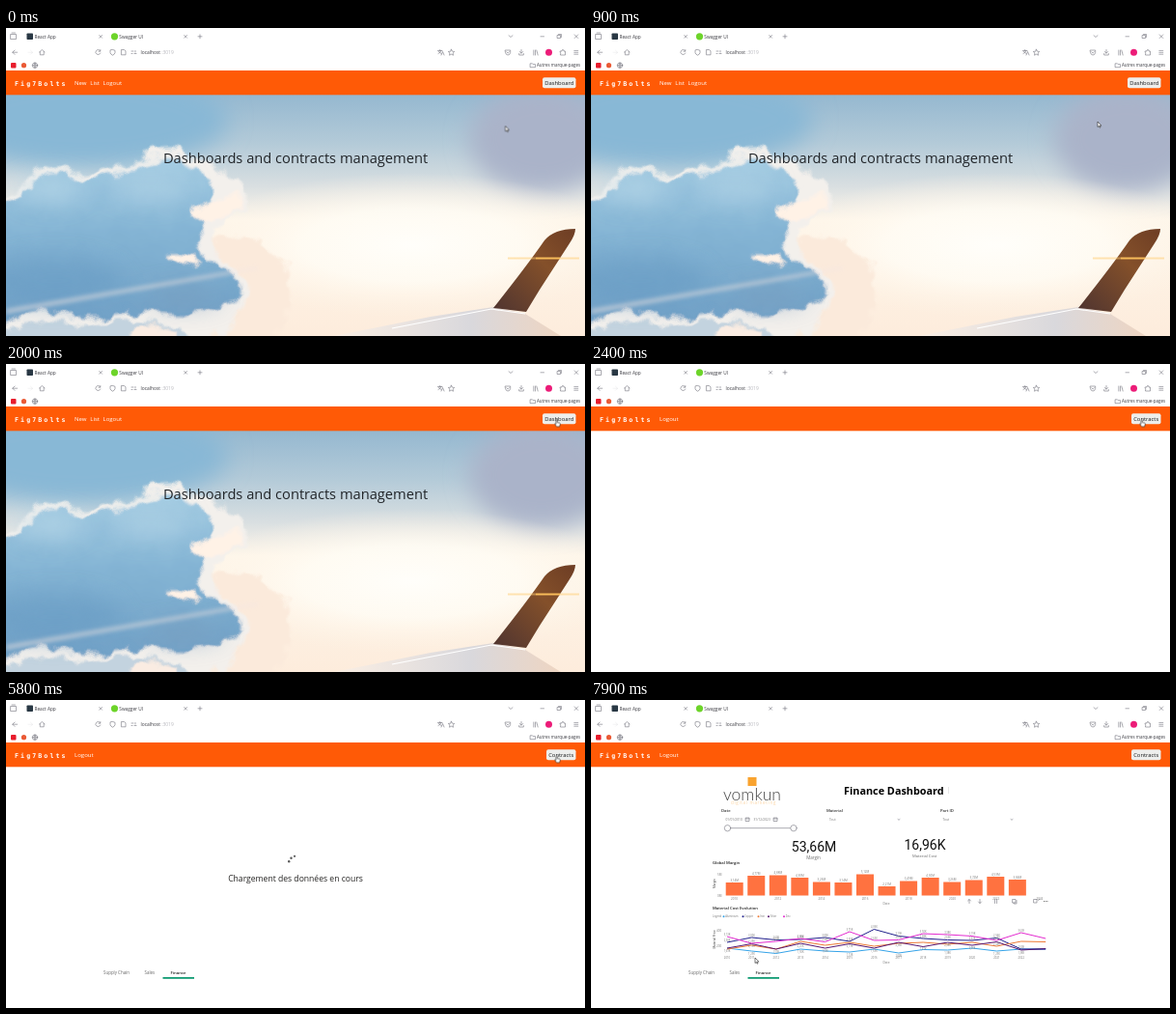
Animation of 600x319 px, one loop 8000 ms. Source, as an HTML page:

```html
<!DOCTYPE html>
<html lang="en">
<head>
<meta charset="utf-8">
<title>Dashboard walkthrough</title>
<style>
html,body{margin:0;width:100%;height:100%;overflow:hidden;background:#fff}
svg{display:block;width:100%;height:100%}
text{font-family:"Open Sans","Noto Sans",sans-serif;white-space:pre}
.icon{fill:none;stroke:#73737c;stroke-width:.6;stroke-linecap:round;stroke-linejoin:round}
.mid{text-anchor:middle}
.mono{font-family:"DejaVu Sans Mono",monospace;font-weight:700;letter-spacing:2.1px}
.nav{font-weight:500}
.kpi{font-family:Roboto,sans-serif}
.thin{font-family:Lato,sans-serif;font-weight:300}
.step{animation:8s step-end infinite}
#photo{animation-name:photo}
#navHome{animation-name:navHome}
#navReport{animation-name:navReport}
#tabs{animation-name:tabs}
#loading{animation-name:loading}
#filters{animation-name:filters}
#charts{animation-name:charts}
#tools{animation-name:tools}
#arrow{animation-name:arrow}
#hand{animation-name:hand}
#splash{animation:splash 8s linear infinite}
#cursor{animation:move 8s linear infinite}
#spin{transform-origin:300px 168.5px;animation:spin 8s linear infinite}
@keyframes photo{27.5%,100%{opacity:0}}
@keyframes navHome{30%,100%{opacity:0}}
@keyframes navReport{0%{opacity:0}30%,100%{opacity:1}}
@keyframes tabs{0%{opacity:0}65%,100%{opacity:1}}
@keyframes loading{0%{opacity:0}68.75%{opacity:1}76.25%,100%{opacity:0}}
@keyframes filters{0%{opacity:0}76.25%,100%{opacity:1}}
@keyframes charts{0%{opacity:0}78.75%,100%{opacity:1}}
@keyframes tools{0%{opacity:0}96.25%,100%{opacity:1}}
@keyframes arrow{0%{opacity:1}22.5%{opacity:0}90%,100%{opacity:1}}
@keyframes hand{0%{opacity:0}22.5%{opacity:1}90%,100%{opacity:0}}
@keyframes splash{0%,30%{opacity:0}41.25%,48.75%{opacity:1}50%{opacity:.8}58.75%,100%{opacity:0}}
@keyframes spin{72.5%{transform:rotate(0)}0%{transform:rotate(-2610deg)}100%{transform:rotate(990deg)}}
@keyframes move{
  0%,2.5%{transform:translate(517.5px,101.5px)}
  11.25%,13.75%{transform:translate(525px,97px);animation-timing-function:ease-in-out}
  23.75%,87.5%{transform:translate(570px,57.5px);animation-timing-function:ease-in-out}
  98.75%,100%{transform:translate(170px,267px)}
}
</style>
</head>
<body>
<svg viewBox="0 0 600 319" preserveAspectRatio="none">
<defs>
  <linearGradient id="sky" x2="0" y2="1">
    <stop stop-color="#95b8d0"/><stop offset=".2" stop-color="#b3cad8"/>
    <stop offset=".38" stop-color="#d9dfe1"/><stop offset=".52" stop-color="#fef6ea"/>
    <stop offset="1" stop-color="#fdecdc"/>
  </linearGradient>
  <radialGradient id="sun">
    <stop stop-color="#fffefa"/><stop offset=".5" stop-color="#fffcf4" stop-opacity=".85"/>
    <stop offset="1" stop-color="#fff4e6" stop-opacity="0"/>
  </radialGradient>
  <linearGradient id="cloud" x2="0" y2="1">
    <stop stop-color="#a3cbe2"/><stop offset=".45" stop-color="#84b4d4"/><stop offset="1" stop-color="#6f9fc5"/>
  </linearGradient>
  <linearGradient id="fin" x1="1" x2="0" y2="1">
    <stop stop-color="#6d3d24"/><stop offset=".4" stop-color="#84502a"/><stop offset="1" stop-color="#4f3430"/>
  </linearGradient>
  <linearGradient id="wing">
    <stop stop-color="#fbefe4"/><stop offset=".6" stop-color="#d9d8dc"/><stop offset="1" stop-color="#eed5c2"/>
  </linearGradient>
  <filter id="soft" x="-50%" y="-50%" width="200%" height="200%"><feGaussianBlur stdDeviation="12"/></filter>
  <filter id="puff" x="-20%" y="-20%" width="140%" height="140%">
    <feTurbulence type="fractalNoise" baseFrequency=".045" numOctaves="3" seed="4" result="noise"/>
    <feGaussianBlur in="SourceGraphic" stdDeviation="1.5"/>
    <feDisplacementMap in2="noise" scale="22" xChannelSelector="R" yChannelSelector="G"/>
  </filter>
  <filter id="edge" x="-20%" y="-50%" width="140%" height="200%"><feGaussianBlur stdDeviation="2"/></filter>
  <clipPath id="page"><rect y="69" width="600" height="250"/></clipPath>
</defs>
<rect width="600" height="319" fill="#fff"/>

<g id="photo" class="step">
  <g clip-path="url(#page)">
    <rect y="69" width="600" height="250" fill="url(#sky)"/>
    <g filter="url(#soft)">
      <ellipse cx="80" cy="95" rx="150" ry="50" fill="#88b8d6"/>
      <ellipse cx="555" cy="115" rx="75" ry="55" fill="#aab3c9"/>
    </g>
    <ellipse cx="420" cy="225" rx="230" ry="75" fill="url(#sun)"/>
    <g filter="url(#puff)">
      <path d="M240 215Q285 225 290 250Q300 285 280 330H180V220Z" fill="#fbeadb"/>
      <path d="M-9 180Q15 168 30 148Q50 138 70 152Q110 150 140 136Q165 114 195 135Q222 132 226 155Q258 160 248 184Q228 196 216 212Q212 240 240 252Q262 268 245 290L210 330H-9Z" fill="#f3f0ec"/>
      <path d="M-9 186Q20 174 34 154Q52 144 72 158Q112 155 145 141Q168 124 190 142Q212 148 214 165Q216 190 200 208Q195 235 232 254Q252 268 238 286Q200 300 150 292Q80 306 40 292L-9 308Z" fill="url(#cloud)"/>
      <path d="M-9 315Q40 296 75 308Q120 296 170 308L210 330H-9Z" fill="#c3d3df"/>
      <path d="M170 232Q190 228 202 242Q186 254 170 232M195 190Q225 172 246 176Q240 192 205 204Z" fill="#fff2e6"/>
      <path d="M130 314Q155 300 176 318V330H130Z" fill="#faece2"/>
    </g>
    <g filter="url(#soft)" opacity=".6">
      <ellipse cx="45" cy="168" rx="35" ry="13" fill="#bddbea"/>
      <ellipse cx="150" cy="165" rx="40" ry="14" fill="#b5d6e7"/>
      <ellipse cx="50" cy="262" rx="70" ry="24" fill="#679bc4"/>
      <ellipse cx="185" cy="278" rx="40" ry="10" fill="#7a9dbd"/>
    </g>
    <path d="M0 291L260 247L262 250L0 296Z" fill="#f4e6e2" opacity=".5" filter="url(#edge)"/>
    <path d="M340 319L440 299L505 289L538 296L575 319Z" fill="url(#wing)"/>
    <path d="M400 311L503 291L538 296" fill="none" stroke="#fff" stroke-width="1.2"/>
    <path d="M505 290Q540 246 558 220Q568 208 590 208Q590 214 584 223L553 271L539 294Z" fill="url(#fin)"/>
    <path d="M549 238.500H574" stroke="#f2ad45" stroke-width="1.600"/>
    <path d="M520 238.500H594" stroke="#ffcc70" stroke-width="2" opacity=".5"/>
  </g>
  <text class="mid" x="300" y="139.500" font-size="14.670" fill="#212529">Dashboards and contracts management</text>
</g>

<g id="chrome">
  <rect x="21.500" y="5.500" width="6.500" height="6.500" rx=".8" fill="#293844"/>
  <circle cx="112.500" cy="8.800" r="3.600" fill="#6dd42a"/>
  <g fill="#3a3a40" font-size="4.750">
    <text x="29.500" y="10.600">React App</text>
    <text x="117.300" y="10.600">Swagger UI</text>
    <text x="139.500" y="27.300" font-size="4.900">localhost<tspan fill="#b5b5bb" dx="1.200">:3019</tspan></text>
    <text x="550" y="40.200" font-size="4.500">Autres marque-pages</text>
  </g>
  <g class="icon">
    <path d="M5 6.500H10.500V11.500H5ZM6 5H9.500M96.700 7.400L99.500 10.200M99.500 7.400L96.700 10.200M184.700 7.400L187.500 10.200M187.500 7.400L184.700 10.200M199 8.800H203M201 6.800V10.800"/>
    <path d="M521 7.700L523 9.500L525 7.700M554 8.800H557.500M571.500 7.500H574.500V10.500H571.500ZM572.500 6.500H575.500V9.500M589.200 6.900L592.800 10.500M592.800 6.900L589.200 10.500"/>
    <path d="M11.700 25.200H6.800M9 23L6.800 25.200L9 27.400M34.500 25L37.300 22.500L40 25M35.300 24.700V27.800H39.200V24.700M97.500 23.500A2.500 2.500 0 1 0 97.800 26M97.800 22.500V24.200H96"/>
    <path d="M110.500 22.400L113 23.300V25.500Q112.500 27.500 110.500 28.200Q108.500 27.500 108 25.500V23.300ZM119.800 22.500H122.500L124 24V27.800H119.800ZM130 24H132M130 26.500H131M133 26.500H135M134 23.500V25"/>
    <path d="M447.500 23.500H452M449.700 22.500V23.500M448 26.500Q450.500 25.500 451 23.500M448.500 24.500L451 26.500M451 28L452.500 24.500L454 28M461.500 22.200L462.500 24.200L464.700 24.500L463.100 26L463.500 28.200L461.500 27.200L459.500 28.200L459.900 26L458.300 24.500L460.500 24.200Z"/>
    <path d="M517.500 23H522.700V25.500Q522 28 520.100 28Q518 28 517.500 25.500ZM518.800 24.800L520.100 26L521.400 24.800M534 22.500V26M532.300 24.500L534 26.200L535.700 24.500M531.700 26.500V28H536.300V26.500M546.800 23V28M548.500 23V28M549.800 23L551.200 28"/>
    <path d="M574.500 24H576V23Q577 21.800 578 23V24H579.500V28H574.500V26.700Q576 26 574.500 25.300ZM588.800 23.400H592.800M588.800 25.300H592.800M588.800 27.200H592.800"/>
    <circle cx="30" cy="38.700" r="2.700"/><path d="M27.300 38.700H32.700M30 36Q27.800 38.700 30 41.400Q32.200 38.700 30 36M543.500 36.800H545.500L546.200 37.600H548.500V40.700H543.500Z"/>
  </g>
  <path class="icon" d="M23 25.200H27.500M25.500 23.200L27.500 25.200L25.500 27.200" opacity=".15"/>
  <circle cx="562.500" cy="25.200" r="3.500" fill="#ec1c78"/>
  <rect x="5" y="36" width="5.500" height="5.500" rx="1" fill="#e81c2c"/>
  <circle cx="18.500" cy="38.700" r="2.600" fill="#ea5a35"/>
  <rect y="44" width="600" height="25.300" fill="#ff5a06"/>
  <text class="mono" x="9" y="59.500" font-size="6.600" fill="#fff">Fig7Bolts</text>
</g>

<g id="navHome" class="step nav" font-size="6.050" fill="#fff">
  <text x="71" y="59.300">New</text><text x="87.300" y="59.300">List</text><text x="100.500" y="59.300">Logout</text>
  <rect x="556" y="51.300" width="34.500" height="11" rx="2" fill="#eeeeec"/>
  <text class="mid" x="573.300" y="59.300" font-size="5.850" fill="#15181b">Dashboard</text>
</g>
<g id="navReport" class="step nav" font-size="6.100" fill="#fff">
  <text x="71" y="59.300">Logout</text>
  <rect x="560" y="51.300" width="30.500" height="11" rx="2" fill="#eeeeec"/>
  <text class="mid" x="575.200" y="59.300" font-size="5.850" fill="#15181b">Contracts</text>
</g>

<rect id="splash" x="290.500" y="179" width="19" height="19" fill="#f8cf55"/>

<g id="tabs" class="step" font-size="4.450" fill="#666">
  <text x="101" y="283.700">Supply Chain</text><text x="143.500" y="283.700">Sales</text>
  <text x="170.500" y="283.700" fill="#222" font-weight="600" font-size="4.300">Finance</text>
  <rect x="162.500" y="287" width="32.500" height="1.800" fill="#129c74"/>
</g>

<g id="loading" class="step">
  <g id="spin" fill="#555">
    <circle cx="293.200" cy="167.300" r="1.200"/><circle cx="295.500" cy="163.800" r="1.200"/><circle cx="299" cy="161.800" r="1.100"/>
  </g>
  <text class="mid" x="300" y="188" font-size="8.600" fill="#252423">Chargement des données en cours</text>
</g>

<g id="filters" class="step" fill="#333">
  <rect x="162.500" y="80" width="9" height="9" fill="#f9a32f"/>
  <text class="mid thin" x="167" y="103.500" font-size="17.500" fill="#444">vomkun</text>
  <text x="145" y="107.700" font-size="4.500" fill="#fbd5a5" letter-spacing=".7">digital marketing</text>
  <text x="262" y="98.300" font-size="10.850" font-weight="700" fill="#000">Finance Dashboard</text>
  <path d="M370.500 90V97" stroke="#ddd" stroke-width=".7"/>
  <g font-size="4.200" font-weight="600">
    <text x="135" y="115.500">Date</text><text x="244" y="115.500">Material</text><text x="362" y="115.500">Part ID</text>
  </g>
  <g font-size="3.250" fill="#777">
    <text x="139.500" y="125">01/01/2010</text><text x="168.500" y="125">31/12/2023</text>
    <text x="247" y="125">Tout</text><text x="364.500" y="125">Tout</text>
  </g>
  <g class="icon">
    <path d="M160.500 122H164V125.500H160.500ZM160.500 123H164M189.500 122H193V125.500H189.500ZM189.500 123H193M318 123.500L319 124.300L320 123.500M435 123.500L436 124.300L437 123.500M141.500 132.700H210"/>
    <circle cx="141.500" cy="132.700" r="3.200" fill="#fff"/><circle cx="210" cy="132.700" r="3.200" fill="#fff"/>
  </g>
  <g class="mid" fill="#111">
    <text class="kpi" x="231" y="157.300" font-size="14">53,66M</text>
    <text class="kpi" x="346" y="155.200" font-size="14">16,96K</text>
    <text x="230.500" y="164.800" font-size="4.500" fill="#666">Margin</text>
    <text x="345.700" y="163" font-size="4.100" fill="#666">Material Cost</text>
  </g>
</g>
<g id="charts" class="step"></g>

<g id="tools" class="step">
  <path class="icon" d="M392 210.500V206.500M390.500 208L392 206.500L393.500 208M403 206.500V210.500M401.500 209L403 210.500L404.500 209M418.500 206.500V210.500M420.500 206.500V210.500M437 206.500H440V210H437ZM438 210V211H441V207.500M459 206.500H462V210H459ZM463.500 207.500L465 206"/>
  <path d="M469 208.500H473.500" stroke="#777" stroke-width="1" stroke-dasharray="1 .7"/>
</g>

<g id="cursor" stroke="#222" stroke-width=".6" stroke-linejoin="round" fill="#fff">
  <path id="arrow" class="step" d="M0 0V5.500L1.300 4.400L2.100 6.200L3 5.800L2.200 4.100H3.900Z"/>
  <path id="hand" class="step" d="M0 .5Q.6-.4 1.200 .5V3L3.700 3.500Q4.500 3.800 4.300 5L3.600 7.300H.6L-1.300 4.700Q-1.200 3.800-.4 4.200L0 4.600Z"/>
</g>
</svg>
<script>
const NS = 'http://www.w3.org/2000/svg';
const charts = document.getElementById('charts');

function add(tag, attrs, content = '') {
  const el = document.createElementNS(NS, tag);
  for (const name in attrs) el.setAttribute(name, attrs[name]);
  el.textContent = content;
  charts.append(el);
}
const label = (x, y, content, size = 3, extra = {}) =>
  add('text', {x, y, 'font-size': size, fill: '#777', ...extra}, content);
const centred = (x, y, content, size) => label(x, y, content, size, {class: 'mid'});
const upright = (x, y, content) =>
  label(x, y, content, 3, {class: 'mid', fill: '#333', transform: `rotate(-90 ${x} ${y})`});
const title = (y, content) => label(126, y, content, 4.2, {fill: '#222', 'font-weight': 600});
const comma = n => n.toFixed(2).replace('.', ',');

// Yearly margin
title(169.5, 'Global Margin');
upright(128.5, 190, 'Margin');
label(131, 182, '5M');
label(131, 203.5, '0M');
[13.5, 20.5, 21, 18.5, 14, 13.5, 22, 9.5, 15, 18.5, 14, 16, 19.5, 16.5].forEach((h, i) => {
  const x = 139.7 + i * 22.55;
  add('rect', {x, y: 202.5 - h, width: 18, height: h, fill: '#ff7240'});
  centred(x + 9, 201.2 - h, comma(h / 4.3) + 'M');
});
for (let i = 0; i < 8; i++) centred(148.5 + i * 45.2, 206.7, 2010 + i * 2);
centred(306, 211.7, 'Date', 3.2);

// Material prices
title(217.2, 'Material Cost Evolution');
label(126, 225.2, 'Legend', 2.7);
const series = [
  ['Aluminium', 137.5, '#35a3e8', [257, 260, 262.5, 258, 260, 261, 258, 262, 258.5, 259, 257, 260, 258, 258]],
  ['Copper', 157.5, '#20208c', [251, 246, 248.5, 248, 246, 250, 237.5, 244.5, 247, 248.5, 249, 246.5, 258, 258]],
  ['Iron', 173.5, '#ee7a36', [258, 254, 258, 250, 254, 251, 255, 252, 251, 253, 251, 255, 250, 250.5]],
  ['Silver', 184, '#55146f', [257, 252.5, 258, 252, 257, 252.5, 257, 251, 255.5, 251, 254, 250.5, 259, 257.5]],
  ['Zinc', 200, '#e32bcf', [245, 252, 250, 247, 250.5, 240, 249, 248.5, 242, 243, 244.5, 249, 241, 247]],
];
const pointX = i => 141 + i * 25.4;
for (const [name, x, color, ys] of series) {
  add('circle', {cx: x, cy: 224.2, r: 1, fill: color});
  label(x + 1.7, 225.2, name, 2.6);
  add('polyline', {points: ys.map((y, i) => [pointX(i), y]).join(' '), fill: 'none', stroke: color, 'stroke-width': 1, 'stroke-linejoin': 'round'});
  if (name === 'Iron') continue;
  const below = name === 'Silver' || name === 'Aluminium';
  ys.slice(0, 13).forEach((y, i) => {
    if (name !== 'Aluminium' || i % 2) centred(pointX(i), y + (below ? 3.5 : -1.3), comma((270 - y) / 8) + 'K', 2.6);
  });
}
for (let i = 0; i < 13; i++) centred(pointX(i), 268.3, 2010 + i, 2.8);
label(130, 240.2, '400');
label(130, 256.2, '200');
upright(128.5, 248, 'Material Price');
centred(306, 272.7, 'Date', 3.2);
</script>
</body>
</html>
```
